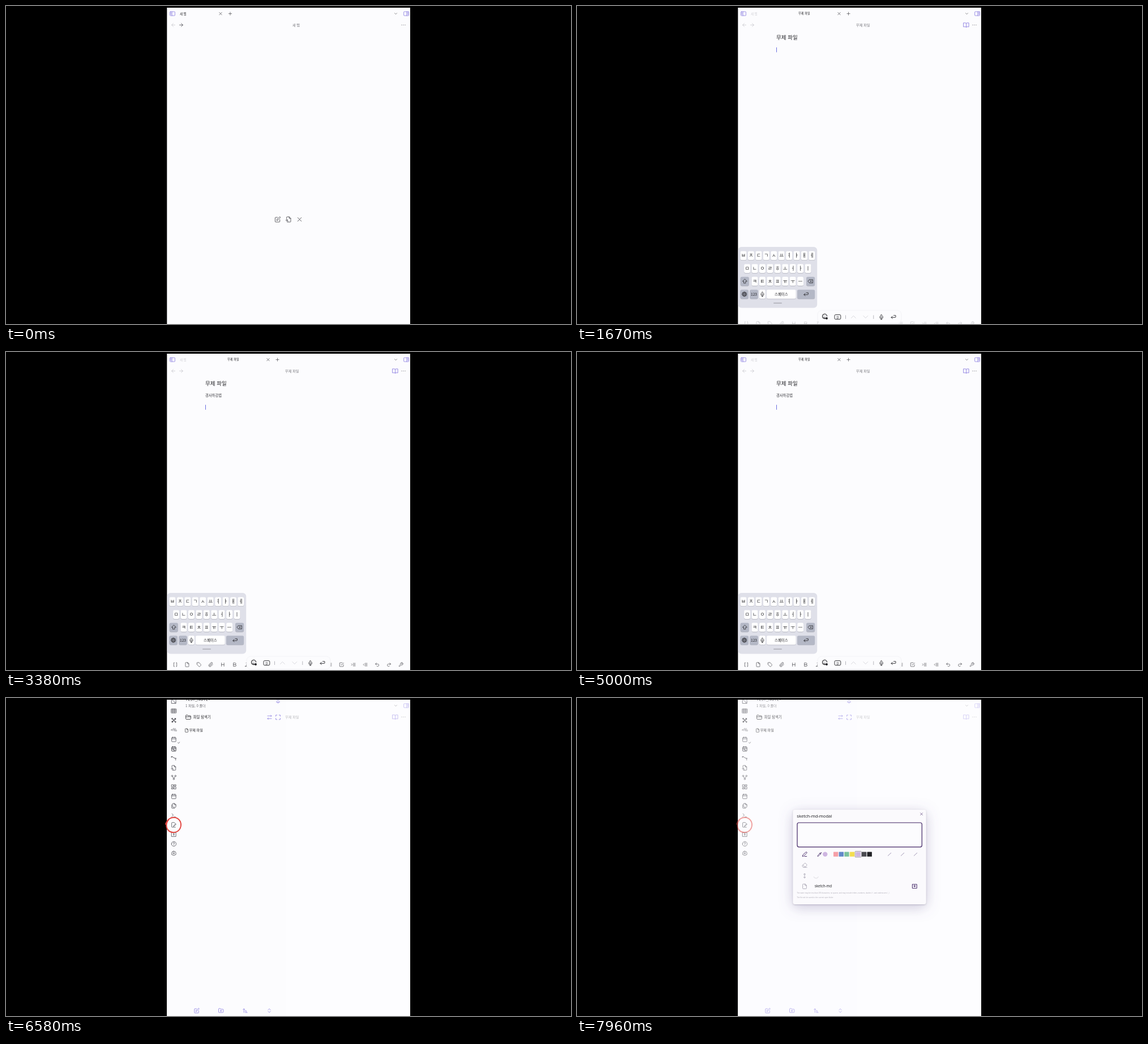
Write an HTML page that moves like this. It is 998 by 561 pixels and loops after 8 s.

```html
<!DOCTYPE html>
<html lang="ko">
<head>
<meta charset="utf-8">
<style>
html, body { margin: 0; width: 100%; height: 100%; overflow: hidden; background: #000; }
svg { display: block; width: 100vw; height: 100vh; }
text { font-family: "Noto Sans CJK KR", "Noto Sans CJK", "Noto Sans", sans-serif; white-space: pre; }
</style>
</head>
<body>
<svg id="stage" viewBox="0 0 998 561" xmlns="http://www.w3.org/2000/svg"></svg>
<script>
const LOOP = 8000;
const BG = '#fcfcfe', INK = '#43434a', DARK = '#222226', PURPLE = '#8678e0', PALE = '#c6c6cc', PLUM = '#3f2263';

// Icon outlines on a 24-unit grid
const FILE = 'M14 2H6a2 2 0 0 0-2 2v16a2 2 0 0 0 2 2h12a2 2 0 0 0 2-2V8zM14 2v6h6';
const CAL = 'M5 4h14a2 2 0 0 1 2 2v14a2 2 0 0 1-2 2H5a2 2 0 0 1-2-2V6a2 2 0 0 1 2-2zM16 2v4M8 2v4M3 10h18';
const FOLDER = 'M4 20a2 2 0 0 1-2-2V5a2 2 0 0 1 2-2h5l2 3h9a2 2 0 0 1 2 2v10a2 2 0 0 1-2 2z';
const ICONS = {
  panel: 'M4 4h16a2 2 0 0 1 2 2v12a2 2 0 0 1-2 2H4a2 2 0 0 1-2-2V6a2 2 0 0 1 2-2zM10 4v16M5 8h2M5 11.500h2M5 15h2',
  x: 'M18 6 6 18M6 6l12 12',
  plus: 'M5 12h14M12 5v14',
  down: 'm6 9 6 6 6-6',
  up: 'm6 15 6-6 6 6',
  left: 'm12 19-7-7 7-7M19 12H5',
  right: 'm12 5 7 7-7 7M5 12h14',
  more: 'M4 12h.01M12 12h.01M20 12h.01',
  edit: 'M11 4H4a2 2 0 0 0-2 2v14a2 2 0 0 0 2 2h14a2 2 0 0 0 2-2v-7M18.500 2.500a2.120 2.120 0 0 1 3 3L12 15l-4 1 1-4z',
  search: 'M14 2v6h6M6 22h12a2 2 0 0 0 2-2V8l-6-6H6a2 2 0 0 0-2 2v5M8 15a3 3 0 1 0-6 0 3 3 0 0 0 6 0M7.500 17.500 10 20',
  book: 'M12 7v14M2 4h7a3 3 0 0 1 3 3 3 3 0 0 1 3-3h7v15h-7a3 3 0 0 0-3 2 3 3 0 0 0-3-2H2z',
  brackets: 'M16 3h3v18h-3M8 21H5V3h3',
  file: FILE,
  tag: 'M11.200 2H4a2 2 0 0 0-2 2v7.200l10 10a2 2 0 0 0 3 0l6-6a2 2 0 0 0 0-3zM7 7.500h.01',
  clip: 'm21 11-9 9a6 6 0 0 1-8.500-8.500l8.600-8.500a4 4 0 1 1 5.600 5.600l-8.600 8.600a2 2 0 0 1-2.800-2.900l8.500-8.400',
  heading: 'M6 12h12M6 20V4M18 20V4',
  bold: 'M6 12h9a4 4 0 0 1 0 8H6V4h8a4 4 0 0 1 0 8',
  italic: 'M19 4h-9M14 20H5M15 4 9 20',
  list: 'M8 6h13M8 12h13M8 18h13M3 6h.01M3 12h.01M3 18h.01',
  check: 'm9 11 3 3L22 4M21 12v7a2 2 0 0 1-2 2H5a2 2 0 0 1-2-2V5a2 2 0 0 1 2-2h11',
  indent: 'm3 8 4 4-4 4M21 12H11M21 6H11M21 18H11',
  outdent: 'm7 8-4 4 4 4M21 12H11M21 6H11M21 18H11',
  undo: 'M9 14 4 9l5-5M4 9h10.500a5.500 5.500 0 0 1 0 11H11',
  redo: 'm15 14 5-5-5-5M20 9H9.500a5.500 5.500 0 0 0 0 11H13',
  wrench: 'M14.700 6.300a1 1 0 0 0 0 1.400l1.600 1.600a1 1 0 0 0 1.400 0l3.800-3.800a6 6 0 0 1-8 8l-6.900 6.900a2.100 2.100 0 0 1-3-3l6.900-6.900a6 6 0 0 1 8-8z',
  mic: 'M12 2a3 3 0 0 0-3 3v7a3 3 0 0 0 6 0V5a3 3 0 0 0-3-3M5 10v2a7 7 0 0 0 14 0v-2M12 19v3M9 22h6',
  enter: 'm8 9-5 5 5 5M3 14h16a2 2 0 0 0 2-2V6h-8',
  shift: 'M12 3 3 12h5v8h8v-8h5z',
  erase: 'M8 5h14v14H8l-6-7zM11 9l6 6M17 9l-6 6',
  globe: 'M2 12a10 10 0 1 0 20 0 10 10 0 1 0-20 0h20M12 2c-6 6-6 14 0 20 6-6 6-14 0-20M4 7h16M4 17h16',
  smile: 'M20 14A9 9 0 1 1 21 9M8 13a5 5 0 0 0 6 2M9 8h.01M15 8h.01',
  square: 'M3 3h18v18H3zM5 5l14 14M8 6h.01M16 18h.01',
  table: 'M2 4h20v17H2zM2 9h20M2 15h20M8 4v17M15 4v17',
  tools: 'm4 4 16 16M20 4 4 20M3 6l3-3M18 21l3-3M16 4l4 4M4 16l4 4',
  calCheck: CAL + 'm8 16 3 3 5-5',
  calPlan: CAL + 'M7 14h6M11 18h6',
  branch: 'M2 5h5l4 5M2 5v3M17 12h5M14 10l3 2M20 16v3',
  graph: 'M8 6a3 3 0 1 0-6 0 3 3 0 1 0 6 0M22 6a3 3 0 1 0-6 0 3 3 0 1 0 6 0M15 19a3 3 0 1 0-6 0 3 3 0 1 0 6 0M7 9l4 7M17 9l-4 7',
  grid: 'M3 3h7v9H3zM14 3h7v5h-7zM14 12h7v9h-7zM3 16h7v5H3z',
  cal: CAL,
  copy: 'M9 2h7l5 5v9a2 2 0 0 1-2 2H9a2 2 0 0 1-2-2V4a2 2 0 0 1 2-2M15 2v6h6M3 7v13a2 2 0 0 0 2 2h11',
  term: 'm4 17 6-6-6-6M12 19h8',
  fileEdit: 'M19 22H5a2 2 0 0 1-2-2V4a2 2 0 0 1 2-2h9l5 5M21 10l-8 8-3 1 1-3 8-8z',
  vault: 'M3 4h18v17H3zM12 8a2.500 2.500 0 1 0 .01 0M12 13v4',
  help: 'M2 12a10 10 0 1 0 20 0 10 10 0 1 0-20 0M9 9a3 3 0 1 1 4 3q-1 .5-1 2M12 17h.01',
  gear: 'm12 2 2 3 4-1 1 4 3 2-1.500 3 .5 4-4 1-2 3-3-1-3 1-2-3-4-1 .5-4L2 10l3-2 1-4 4 1zM9 12a3 3 0 1 0 6 0 3 3 0 1 0-6 0',
  folder: FOLDER + 'M2 10h20',
  folderPlus: FOLDER + 'M12 10v6M9 13h6',
  swap: 'm17 2 4 4-4 4M3 6h18M7 14l-4 4 4 4M21 18H3',
  expand: 'M8 3H3v5M16 3h5v5M8 21H3v-5M16 21h5v-5',
  sort: 'm3 8 4-4 4 4M7 4v16M13 12h3M13 16h5M13 20h8',
  updown: 'm7 15 5 5 5-5M7 9l5-5 5 5',
  pin: 'M12 17v5M8 3h8l-1 8 4 4v2H5v-2l4-4z',
  pen: 'M17 3a2.800 2.800 0 1 1 4 4L8 20l-5 1 1-5zM12 21h9',
  pipette: 'm3 21 1-4 9-9 3 3-9 9zM12 6l6 6M15 9l4-6 2 2-6 4z',
  rubber: 'm7 21-4-4q-2-2 0-4l9-9q2-2 4 0l5 5q2 2 0 4l-8 8M22 21H7M5 11l9 9',
  beam: 'M12 3v18M8 6l4-3 4 3M8 18l4 3 4-3',
  save: 'M9 4H3v16h18V4h-6M12 3v11M8 10l4 4 4-4'
};

const icon = (name, x, y, size = 10, color = INK, w = 1.8) =>
  `<path d="${ICONS[name]}" transform="translate(${x - size / 2} ${y - size / 2}) scale(${size / 24})" fill="none" stroke="${color}" stroke-width="${w}" stroke-linecap="round" stroke-linejoin="round"/>`;
const text = (s, x, y, size, color = DARK, extra = '') =>
  `<text x="${x}" y="${y}" font-size="${size}" fill="${color}" ${extra}>${s}</text>`;
const rect = (x, y, w, h, fill, r = 0, extra = '') =>
  `<rect x="${x}" y="${y}" width="${w}" height="${h}" rx="${r}" fill="${fill}" ${extra}/>`;
const group = (id, body, extra = '') => `<g id="${id}" ${extra}>${body}</g>`;
const MID = 'text-anchor="middle"';

function chrome() {
  return icon('panel', 294, 13.5, 10.5, PURPLE) +
    `<g transform="translate(1414 0) scale(-1 1)">${icon('panel', 707, 13.5, 10.5, PURPLE)}</g>` +
    icon('down', 688.5, 13.5, 8) + icon('more', 702, 33.5, 9, INK, 3);
}

function newTab() {
  return text('새 탭', 307, 15.5, 5.4) + icon('x', 379, 13.5, 9) + icon('plus', 396, 13.5, 9) +
    icon('left', 295.5, 33.5, 10, PALE) + icon('right', 309.5, 33.5, 10) +
    text('새 탭', 512.5, 35.7, 6.2, '#77777d', MID) +
    icon('edit', 480, 376.5, 11) + icon('search', 499.3, 376.5, 11) + icon('x', 518.5, 376.5, 13, INK, 1.5);
}

function note() {
  return text('새 탭', 307, 15.5, 5.4, '#d0d0d6') + text('무제 파일', 391, 15.3, 5.2) +
    icon('x', 463, 13.5, 9) + icon('plus', 479.5, 13.5, 9) +
    icon('left', 295.5, 33.5, 10, PALE) + icon('right', 309.5, 33.5, 10, PALE) +
    text('무제 파일', 493, 35.7, 6.15, '#77777d') + icon('book', 687.5, 33.5, 11, PURPLE) +
    group('select', rect(352, 48, 37, 14, '#e6e6fa') +
      rect(352, 48, 1, 14, '#5566ee') + rect(388.6, 48, 1, 15, '#5566ee') +
      '<g fill="#5566ee"><circle cx="352.6" cy="47.5" r="3.500"/><circle cx="389.200" cy="64.500" r="3.500"/></g>') +
    `<text id="title" x="352" y="58.700" font-size="9.500" font-weight="500">무제 파일</text>` +
    text('', 352, 79.2, 6.3, '#333338', 'id="body"') +
    rect(352, 73, 1, 8.6, '#6a6fe0', 0, 'id="caret"');
}

function toolbar() {
  const left = ['brackets', 'file', 'tag', 'clip', 'heading', 'bold', 'italic'];
  const right = ['list', 'check', 'indent', 'outdent', 'undo', 'redo', 'wrench'];
  const put = (names, x0) => names.map((n, i) => icon(n, x0 + i * 20.97, 551.5, 9)).join('');
  return put(left, 299) + put(right, 571.7);
}

function accessory() {
  return rect(425, 537, 148, 22.5, BG, 7, 'id="pill" stroke="#f0f0f4" stroke-width=".8"') +
    icon('smile', 437.5, 548.5, 11, DARK, 2.2) + '<circle cx="441" cy="551" r="1.900" fill="#222226"/>' +
    rect(455, 544.6, 10.8, 8, 'none', 1.8, `stroke="${DARK}" stroke-width=".9"`) + text('한', 460.4, 550.6, 5, DARK, MID) +
    rect(474.2, 545.5, .7, 6.5, '#99999f') + icon('up', 488.4, 548.5, 16, '#d2d2d8', 1.3) +
    `<g id="down">${icon('down', 509.8, 548.5, 16, 'currentColor', 1.3)}</g>` +
    rect(523.5, 545.5, .7, 6.5, '#99999f') + icon('mic', 537.6, 548.7, 10, DARK) + icon('enter', 559, 548.5, 10.5, DARK, 2);
}

function keyboard() {
  const key = (x, y, w, fill = '#fff') =>
    rect(x - w / 2, y - 7.2, w, 16, '#b4b5bf', 2.4) + rect(x - w / 2, y - 7.8, w, 15.8, fill, 2.4);
  const row = (chars, x0, y) => [...chars].map((c, i) => {
    const x = x0 + i * 13.43;
    return key(x, y, 10.9) + text(c, x, y + 3, 8.6, DARK, MID);
  }).join('');
  const gray = '#b4b8c6';
  return rect(284.5, 425, 139.7, 107.5, '#dfe0e9', 6) +
    row('ㅂㅈㄷㄱㅅㅛㅕㅑㅐㅔ', 294, 440.2) + row('ㅁㄴㅇㄹㅎㅗㅓㅏㅣ', 300.6, 463) + row('ㅋㅌㅊㅍㅠㅜㅡ', 314, 485.6) +
    key(296.2, 485.6, 15, gray) + icon('shift', 296.2, 485.7, 10, DARK) +
    key(412.6, 485.6, 15, gray) + icon('erase', 412.3, 485.7, 10, DARK) +
    key(295.7, 508.4, 14.5, gray) + icon('globe', 295.6, 508.4, 9.5, DARK) +
    key(312.5, 508.4, 14.5, gray) + text('123', 312.5, 510.9, 6.6, DARK, MID) +
    key(327.4, 508.4, 11) + icon('mic', 327.4, 508.4, 9.5, DARK) +
    key(360.8, 508.4, 51.8) + text('스페이스', 360.8, 510.6, 6.4, DARK, MID) +
    group('done', key(404.6, 508.4, 31, '#087cf8') + text('완료', 404.6, 510.6, 6.4, '#fff', MID)) +
    group('ret', key(404.6, 508.4, 31, gray) + icon('enter', 404.6, 508.4, 10, DARK, 2)) +
    rect(347, 523.4, 15, 1.4, '#a3a4ac', .7);
}

function sidebar() {
  const ribbon = ['square', 'table', 'tools', '', 'calCheck', 'calPlan', 'branch', 'search', 'graph', 'grid', 'cal', 'copy', 'term', 'fileEdit', 'vault', 'help', 'gear'];
  const heavy = { tools: 2.8, calPlan: 2.4, branch: 2.4 };
  const foot = ['edit', 'folderPlus', 'sort', 'updown'];
  return rect(284, 2, 210, 560, BG) +
    ribbon.map((n, i) => n && icon(n, 296.4, 5.8 + i * 16.77, 10, INK, heavy[n])).join('') +
    text('&lt;%', 296.4, 59, 7.4, INK, MID + ' font-weight="500"') +
    text('TEST_NOTE', 317, 5.4, 7.2, DARK, 'font-weight="500"') + icon('updown', 359, 2, 6) +
    icon('pin', 480.5, 5.5, 9.5, PURPLE) + text('1 파일, 0 폴더', 317, 15.6, 6, '#66666c') +
    icon('folder', 322, 34, 10.5, DARK) + text('파일 탐색기', 330.8, 36.4, 6.3) +
    icon('swap', 465.5, 34, 9.5, PURPLE) + icon('expand', 480.5, 34, 10.5, PURPLE) +
    icon('file', 319, 57.2, 7.5, DARK, 2) + text('무제 파일', 323.7, 59.3, 6.1) +
    foot.map((n, i) => icon(n, 337 + i * 42.7, 551.5, 10, PURPLE)).join('');
}

function modal() {
  const swatches = ['#f59fa7', '#6389c9', '#7bc19c', '#f3dd50', '#ceb5e1', '#49494f', '#222226'];
  const slash = x => `<path d="M${x - 3} 278.500l6-5.500" stroke="#8d81a5" stroke-width=".8"/>`;
  return rect(381.5, 197, 235, 167, '#fbfafd', 4, 'filter="url(#shadow)"') +
    text('sketch-md-modal', 388.3, 211, 7.55, DARK, 'style="font-family:\'Noto Sans\',sans-serif"') +
    icon('x', 608.5, 204.7, 8, PLUM) +
    rect(389, 220, 220.3, 42.8, BG, 3, `stroke="${PLUM}" stroke-width="1.200"`) +
    icon('pen', 402, 275.7, 10, PLUM, 2.2) + icon('pipette', 428.5, 275.7, 9, PLUM, 2.2) +
    '<circle cx="438.300" cy="275.600" r="4.200" fill="#ceb5e1"/>' +
    rect(491.2, 270.4, 11, 10.4, 'none', .8, 'stroke="#88858f" stroke-width=".8"') +
    swatches.map((c, i) => rect(453 + i * 9.6 + (i > 3 ? .9 : 0) + (i > 4 ? 1 : 0), 271.4, 8.4, 8.4, c, .5)).join('') +
    slash(552) + slash(575) + slash(598) +
    icon('rubber', 402, 295, 10, '#9a95a5') + icon('beam', 402, 313.7, 10, '#9a95a5') +
    '<path d="M418 315a4.500 4.500 0 0 0 8.500 0" fill="none" stroke="#d5d3da" stroke-width=".8"/>' +
    icon('file', 402, 332.4, 10, '#9a95a5') +
    text('sketch-md', 419.7, 334.2, 6.2, DARK, 'style="font-family:\'Noto Sans\',sans-serif"') +
    icon('save', 596.3, 332.2, 10.5, PLUM, 2.2) +
    text('The name may be less than 100 characters, no spaces, and may include letters, numbers, dashes (-), and underscores (_).', 388.3, 345, 2.9, '#aaa7b2') +
    text('The file will be saved in the current open folder.', 388.3, 353, 2.9, '#aaa7b2');
}

// Loosely hand-drawn ring whose two ends overlap
const ring = (id, x, y) =>
  `<path id="${id}" transform="translate(${x} ${y})" d="M-14 -1.500C-11 -11 -4 -13.500 1 -13.200C9 -12.800 13.500 -6 13 .5C12.500 8 7 13 -.5 13.200C-7 13.200 -12 8.500 -12.600 2C-12.900 -2 -11.500 -6 -8.500 -9.500" fill="none" stroke="#e2443f" stroke-width="1.900" stroke-linecap="round" pathLength="100" stroke-dasharray="100 200"/>`;

const stage = document.getElementById('stage');
stage.innerHTML =
  `<defs><clipPath id="page"><rect x="284.300" y="3" width="429.600" height="558"/></clipPath>
  <filter id="shadow" x="-30%" y="-30%" width="160%" height="170%"><feDropShadow dx="0" dy="5" stdDeviation="12" flood-color="#6f63a0" flood-opacity=".26"/><feDropShadow dx="0" dy="1" stdDeviation="1.500" flood-color="#222" flood-opacity=".28"/></filter></defs>` +
  rect(0, 0, 998, 561, '#000') +
  `<g clip-path="url(#page)">` + rect(284, 3, 430, 558, BG) + chrome() +
  group('newTab', newTab()) + group('note', note()) +
  group('toolbar', toolbar()) + group('accessory', accessory()) + group('keyboard', keyboard()) +
  rect(284, 3, 430, 558, BG, 0, 'id="dim"') + group('sidebar', sidebar()) +
  rect(284, 3, 430, 558, BG, 0, 'id="veil"') + group('modal', modal()) + '</g>' +
  ring('ring1', 293.5, 13.5) + ring('ring2', 296, 224);

const el = {};
stage.querySelectorAll('[id]').forEach(n => el[n.id] = n);
const ramp = (t, a, b) => Math.min(1, Math.max(0, (t - a) / (b - a)));
const easeOut = p => 1 - (1 - p) ** 3;
const fade = (id, o) => {
  el[id].setAttribute('opacity', o);
  el[id].setAttribute('display', o > 0 ? 'inline' : 'none');
};
const move = (id, x, y) => el[id].setAttribute('transform', `translate(${x} ${y})`);

const typing = 'ㄱ 겨 경 경ㅅ 경사 경샇 경사하 경사학 경사하가 경사하강 경사하강ㅂ 경사하강버 경사하강법'.split(' ');
const CREATE = 520, SHOW = 900, ENTER = 1450, TYPE = 1880, STROKE = 95, BREAK = 3300, CLOSE = 5040;

function drawRing(id, t, start, fadeAt) {
  fade(id, t < start ? 0 : 1 - ramp(t, fadeAt, fadeAt + 620));
  el[id].setAttribute('stroke-dashoffset', 100 * (1 - ramp(t, start, start + 420)));
}

function render(t) {
  const made = t >= CREATE, inBody = t >= ENTER;
  fade('newTab', made ? 0 : 1);
  fade('note', made ? 1 : 0);
  fade('select', made && !inBody ? 1 : 0);
  el.title.setAttribute('fill', inBody ? '#222226' : '#17174a');

  const typed = Math.min(typing.length, Math.floor((t - TYPE) / STROKE) + 1);
  el.body.textContent = typed > 0 ? typing[typed - 1] : '';
  const broke = t >= BREAK;
  const busy = typed > 0 && !broke;
  const blink = (t - (broke ? BREAK : ENTER)) % 1100 < 660;
  fade('caret', inBody && t < CLOSE && (busy || blink) ? 1 : 0);
  el.caret.setAttribute('x', busy ? 352 + [...typing[typed - 1]].length * 5.8 : 352);
  el.caret.setAttribute('y', broke ? 93.2 : 73);

  const pop = easeOut(ramp(t, SHOW, SHOW + 400));
  const gone = ramp(t, CLOSE, CLOSE + 180);
  const s = .6 + .4 * pop;
  el.keyboard.setAttribute('transform', `translate(354.300 478.700) scale(${s}) translate(-354.300 -478.700)`);
  fade('keyboard', ramp(t, SHOW, SHOW + 150) * (1 - gone));
  fade('accessory', ramp(t, SHOW, SHOW + 150) * (1 - gone));
  move('accessory', 0, 26 * (1 - pop) + 24 * gone);
  fade('pill', ramp(t, ENTER, ENTER + 100));
  el.down.setAttribute('color', inBody ? '#d2d2d8' : '#3d86d8');
  fade('done', inBody ? 0 : 1);
  fade('ret', inBody ? 1 : 0);

  const rise = ramp(t, 1600, 1850);
  fade('toolbar', rise * (1 - gone));
  move('toolbar', 0, 24 * (1 - easeOut(rise)) + 24 * gone);

  const slide = easeOut(ramp(t, 5080, 5380));
  fade('dim', slide * .48);
  fade('sidebar', slide > 0 ? 1 : 0);
  move('sidebar', -212 * (1 - slide), 0);

  const open = ramp(t, 7680, 7860);
  fade('veil', open * .3);
  fade('modal', open);

  drawRing('ring1', t, 3480, 4350);
  drawRing('ring2', t, 5560, 7650);
}

function tick() {
  render(performance.now() % LOOP);
  requestAnimationFrame(tick);
}
tick();
</script>
</body>
</html>
```
